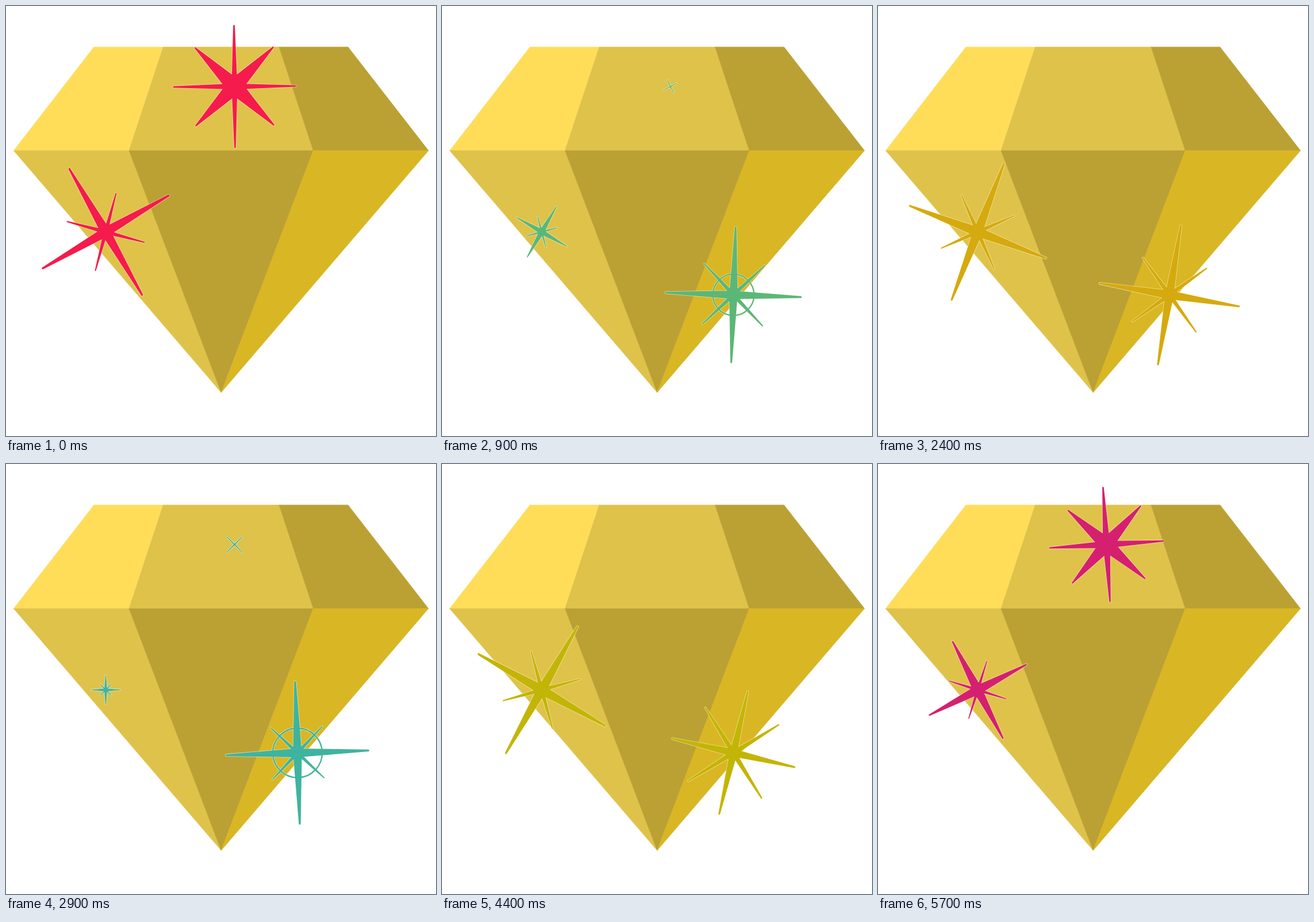
Write an HTML page with a canvas that moves like this. It is 748x748 px and loops after 5730 ms.

```html
<!DOCTYPE html>
<html lang="en">
<head>
<meta charset="utf-8">
<title>Sparkling gem</title>
<style>
  html, body { margin: 0; width: 100%; height: 100%; overflow: hidden; background: #fff; }
  canvas { display: block; width: 748px; height: 748px; }
</style>
</head>
<body>
<canvas id="stage" width="748" height="748"></canvas>
<script>
const ctx = document.getElementById('stage').getContext('2d');
const LOOP = 5730;      // ms
const TICK = 100 / 3;   // display tick, ms
const POSE = 2.4;       // ticks per pose
const CYCLE = 24;       // poses per sparkle cycle

const GOLD = '#dfc24a', OLIVE = '#bba133', SUN = '#ffdd59', AMBER = '#d9b623';
const HALO = 'rgba(255,250,225,0.6)';
const PALETTE = ['#f51b4c', '#f7941d', '#b2c000', '#3eb4a0', '#5f59d5', '#7530da'];

// 0 before a, 1 after b, linear between; fall is its reverse.
const ramp = (k, a, b) => Math.min(1, Math.max(0, (k - a) / (b - a)));
const fall = (k, a, b) => 1 - ramp(k, a, b);

// Grow, dip halfway through the glow, recover, then fade.
function twinkle(age, depth) {
  const dip = ramp(age, 4, 8) * fall(age, 8, 12);
  return ramp(age, 0, 4) * (1 - depth * dip) * fall(age, 12, 18);
}

function colorAt(k) {
  const pos = k * PALETTE.length / CYCLE;
  const i = Math.floor(pos);
  const rgb = hex => [1, 3, 5].map(n => parseInt(hex.slice(n, n + 2), 16));
  const from = rgb(PALETTE[i]), to = rgb(PALETTE[(i + 1) % PALETTE.length]);
  return `rgb(${from.map((c, n) => Math.round(c + (to[n] - c) * (pos - i)))})`;
}

function topSparkle(k) {
  const age = (k + 12) % CYCLE;
  const short = 97 * (ramp(k, 9, 24) + fall(k, 0, 6));
  return {
    x: 397.5, y: 140,
    long: 107 * twinkle(age, 0.25),
    short,
    longCore: 18 - 13 * ramp(age, 4, 12),
    shortCore: 16 * (short / 97) ** 2,
    turn: 15 * ramp(age, 0, 4) - 27.5 * ramp(age, 4, 8) + 30 * ramp(age, 8, 18)
  };
}

function leftSparkle(k) {
  const age = (k + 4) % CYCLE;
  const long = 128 * ramp(age, 0, 4) * fall(age, 12, 17);
  return {
    x: 173.5, y: 393,
    long,
    short: long * 0.55,
    longCore: Math.min(9, long * 0.1),
    shortCore: long * 0.03,
    turn: -20 - 10 * ramp(age, 0, 4) + 68 * ramp(age, 4, 12)
      - 8 * ramp(age, 12, 15) - 30 * ramp(age, 15, 16)
  };
}

function rightSparkle(k) {
  const long = (153 - 28 * ramp(k, 4, 12)) * twinkle(k, 0.3);
  const short = 107 * ramp(k, 0, 8) * fall(k, 8, 18);
  return {
    x: 507, y: 502.5,
    long, short,
    longCore: long * 0.065,
    shortCore: short * 0.05,
    turn: 15 * ramp(k, 3.5, 7.5) - 37.5 * ramp(k, 7.5, 17.5),
    ring: 43 * ramp(k, 6, 12) * fall(k, 12, 21)
  };
}

function facet(color, ...points) {
  ctx.beginPath();
  points.forEach(([x, y]) => ctx.lineTo(x, y));
  ctx.closePath();
  ctx.fillStyle = ctx.strokeStyle = color;
  ctx.lineWidth = 0.6;
  ctx.fill();
  ctx.stroke();
}

function drawGem() {
  const top = [153, 273.5, 475, 595].map(x => [x, 71.2]);
  const girdle = [13.3, 214, 534.5, 735].map(x => [x, 251.5]);
  const tip = [374.3, 672.3];
  [SUN, GOLD, OLIVE].forEach((c, i) => facet(c, top[i], top[i + 1], girdle[i + 1], girdle[i]));
  [GOLD, OLIVE, AMBER].forEach((c, i) => facet(c, girdle[i], girdle[i + 1], tip));
}

// Four-pointed star; core is the distance of its inner corners.
function star(length, core, angle) {
  const width = Math.max(1.2, length * 0.026);
  const path = new Path2D();
  for (let i = 0; i < 8; i++) {
    const r = i % 2 ? core : length - width / 2;
    const a = angle + i * Math.PI / 4;
    path.lineTo(r * Math.sin(a), -r * Math.cos(a));
  }
  path.closePath();
  return { path, width, filled: true };
}

function ringShape(radius) {
  const path = new Path2D();
  path.arc(0, 0, radius, 0, Math.PI * 2);
  return { path, width: 2.3 };
}

function drawSparkle(s, color) {
  const shapes = [];
  if (s.long > 1) shapes.push(star(s.long, s.longCore, 0));
  if (s.short > 1) shapes.push(star(s.short, s.shortCore, Math.PI / 4));
  if (s.ring && s.long > 1) shapes.push(ringShape(s.ring));

  ctx.save();
  ctx.translate(s.x, s.y);
  ctx.rotate(s.turn * Math.PI / 180);
  ctx.lineJoin = 'round';
  for (const [style, extra] of [[HALO, 1.6], [color, 0]]) {
    ctx.strokeStyle = ctx.fillStyle = style;
    for (const { path, width, filled } of shapes) {
      ctx.lineWidth = width + extra;
      ctx.stroke(path);
      if (filled) ctx.fill(path);
    }
  }
  ctx.restore();
}

function draw(time) {
  const tick = Math.floor((time % LOOP + 3.5) / TICK);
  const k = Math.floor(tick / POSE + 1e-6) % CYCLE;
  ctx.fillStyle = '#fff';
  ctx.fillRect(0, 0, 748, 748);
  drawGem();
  for (const sparkle of [topSparkle, leftSparkle, rightSparkle]) drawSparkle(sparkle(k), colorAt(k));
}

function loop(now) {
  draw(Math.max(0, now));
  requestAnimationFrame(loop);
}

draw(0);
requestAnimationFrame(loop);
</script>
</body>
</html>
```
